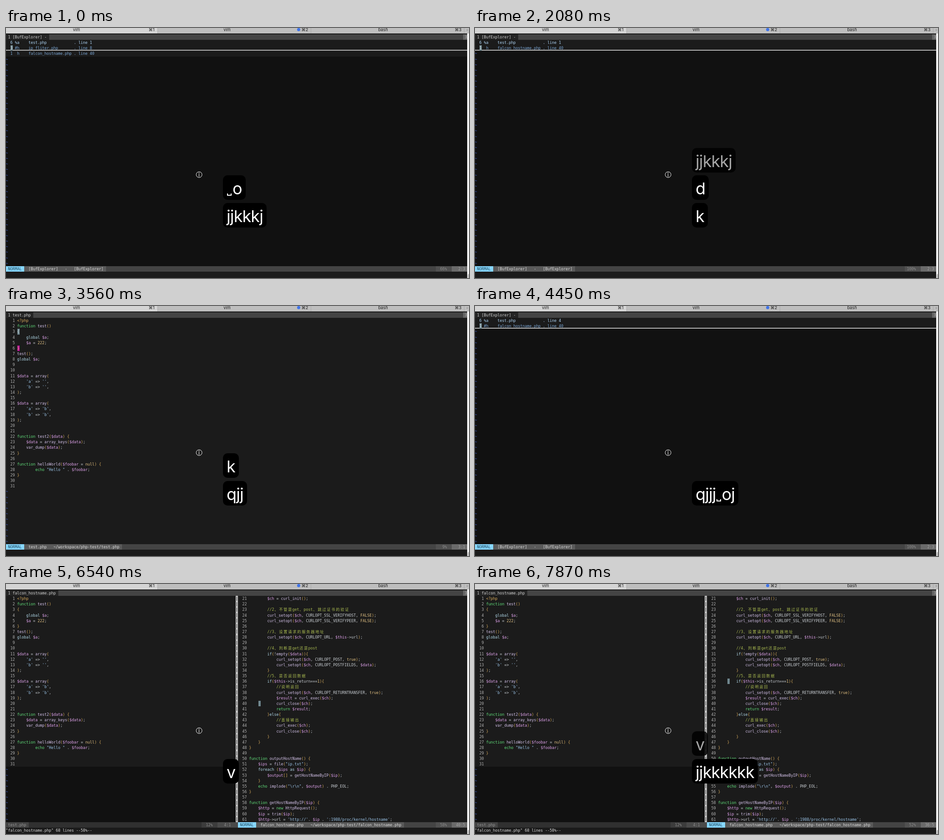
Animation, 1018 px wide and 550 px high, one loop 8 s. Source, as an HTML page:

```html
<!DOCTYPE html>
<html lang="en">
<head>
<meta charset="utf-8">
<title>Buffer explorer demo</title>
<style>
html, body { margin: 0; width: 100%; height: 100%; overflow: hidden; background: #1b1b1b; }
#stage { position: relative; width: 1018px; height: 550px; overflow: hidden; background: #1b1b1b; }
#stage div, #stage svg { position: absolute; }
#tabs { left: 0; top: 0; width: 1018px; height: 12px; background: #bebebe;
  font: 9.2px/11px Inter, "DejaVu Sans", sans-serif; color: #1c1c1c; }
#tabs .on { left: 0; top: 0; width: 333px; height: 12px; background: #d4d4d4; }
#tabs .sep { top: 0; width: 1px; height: 12px; background: #a9a9a9; }
#tabs .label { top: -2px; width: 80px; margin-left: -40px; text-align: center; }
#tabs .dot { left: 640px; top: -.5px; width: 7px; height: 7px; border-radius: 50%; background: #3f74ea; }
#side { left: 1014px; top: 12px; width: 4px; height: 538px; background: #f3f3f3; }
#thumb { left: 1015px; top: 541px; width: 3px; height: 9px; border-radius: 3px 0 0 0; background: #bdbdbd; }
#term { left: -.5px; top: 14px; width: 1014.5px; height: 536px; overflow: hidden;
  font: 8.305px/12.14px "DejaVu Sans Mono", "Noto Sans CJK SC", monospace; color: #c8cdd2; white-space: pre; }
#term i { display: inline-block; width: 10px; font-style: normal; text-align: center; }
.num { color: #b4b4b4; }
.tilde { color: #3d5cc4; }
.tag, .par { color: #d7ab5c; }
.fn { color: #62e27c; }
.kw { color: #b4dcec; }
.var { color: #e2a4ee; }
.val { color: #e2c284; }
.str { color: #9cc6ea; }
.com { color: #a9ba50; }
.call { color: #d6c4ec; }
.cur { color: #d9e4e8; background: #6f868e; }
.match { color: #f0d860; background: #b8109c; }
.key { left: 477px; height: 54px; padding: 0 8px; border-radius: 10px; background: #000; color: #fff;
  font: 36px/59px Inter, "Liberation Sans", sans-serif; letter-spacing: -.9px; white-space: nowrap; }
.key.dim { background: rgba(0, 0, 0, .85); color: #a6a6a6; }
.key b { display: inline-block; box-sizing: border-box; width: 10px; height: 5px; margin: 0 2px -3px 1px;
  border: solid; border-width: 0 2px 2px; }
</style>
</head>
<body>
<div id="stage">
  <div id="tabs">
    <div class="on"></div>
    <div class="sep" style="left:333px"></div>
    <div class="sep" style="left:670px"></div>
    <div class="sep" style="left:1007px"></div>
    <div class="label" style="left:155px">vim</div>
    <div class="label" style="left:320px">⌘1</div>
    <div class="label" style="left:486px">vim</div>
    <div class="dot"></div>
    <div class="label" style="left:657px">⌘2</div>
    <div class="label" style="left:829px">bash</div>
    <div class="label" style="left:994px">⌘3</div>
    <div class="label" style="left:1014px;color:#8c8c8c">+</div>
  </div>
  <div id="term"></div>
  <div id="side"></div>
  <div id="thumb"></div>
  <svg style="left:416px;top:314px" width="18" height="18" fill="none" stroke="#f2f2f2">
    <circle cx="8.6" cy="8.6" r="6.4"/>
    <path d="M6.6 4.2q1.6 0 1.8 1.3v6.2q-.2 1.3-1.8 1.3M10.2 4.2q-1.6 0-1.8 1.3M10.2 13q-1.6 0-1.8-1.3M7 9.4h2.8" stroke-width=".7"/>
  </svg>
  <div id="keys"></div>
</div>
<script>
const CW = 5, RH = 12.14, COLS = 203, LOOP = 8000;
const term = document.getElementById('term');
const keyBox = document.getElementById('keys');

const testCode = String.raw`<?php
function test()
{
    global $a;
    $a = 222;
}
test();
global $a;


$data = array(
    'a' => '',
    'b' => '',
);

$data = array(
    'a' => 'b',
    'b' => 'b',
);


function test2($data) {
    $data = array_keys($data);
    var_dump($data);
}

function helloWorld($foobar = null) {
        echo "Hello " . $foobar;
}

`.split('\n');

const hostCode = String.raw`        $ch = curl_init();

        //2、不管是get、post、跳过证书的验证
        curl_setopt($ch, CURLOPT_SSL_VERIFYHOST, FALSE);
        curl_setopt($ch, CURLOPT_SSL_VERIFYPEER, FALSE);

        //3、设置请求的服务器地址
        curl_setopt($ch, CURLOPT_URL, $this->url);

        //4、判断是get还是post
        if(!empty($data)){
            curl_setopt($ch, CURLOPT_POST, true);
            curl_setopt($ch, CURLOPT_POSTFIELDS, $data);
        }
        //5、是否返回数据
        if($this->is_return===1){
            //说明返回
            curl_setopt($ch, CURLOPT_RETURNTRANSFER, true);
            $result = curl_exec($ch);
            curl_close($ch);
            return $result;
        }else{
            //直接输出
            curl_exec($ch);
            curl_close($ch);
        }
    }
}

function outputHostName() {
    $ips = file("ip.txt");
    foreach ($ips as $ip) {
        $output[] = getHostNameByIP($ip);
    }
    echo implode("\r\n", $output) . PHP_EOL;
}

function getHostNameByIP($ip) {
    $http = new HttpRequest();
    $ip = trim($ip);
    $http->url = 'http://'. $ip . ':1988/proc/kernel/hostname';`.split('\n');

// Syntax colouring: one capture group per class
const classes = ['com', 'str', 'var', 'tag', 'fn', 'kw', 'val', 'call', 'par'];
const tokens = /(\/\/.*)|('[^']*'|"[^"]*")|(\$\w+)|(<\?php)|\b(function|echo|return|new)\b|\b(global|if|else|foreach|as)\b|\b(\d+|true|FALSE|null)\b|(\w+(?=\())|([()[\]{}])/g;
const esc = s => s.replace(/</g, '&lt;');
const wide = s => s.replace(/[\u3001\u4e00-\u9fff]/g, '<i>$&</i>');
const paint = s => s.replace(tokens, (m, ...g) =>
  `<span class="${classes[g.findIndex((v, i) => i < classes.length && v !== undefined)]}">${wide(esc(m))}</span>`);

// Text or colour block at a terminal cell
const put = (row, col, html, cls = '', css = '') =>
  `<div class="${cls}" style="left:${col * CW}px;top:${(row * RH).toFixed(2)}px;height:${RH}px;${css}">${html}</div>`;
const block = (row, from, to, bg, rows = 1) =>
  put(row, from, '', '', `width:${(to - from) * CW}px;height:${(rows * RH).toFixed(2)}px;background:${bg}`);

const tabLine = name => {
  const end = name.length + 4;
  return block(0, 0, COLS, '#444') + block(0, 0, end, '#242424') + block(0, 201, COLS, '#666') +
    put(0, 1, '1 ' + name, '', 'color:#d2d2d2') + put(0, 202, 'X', '', 'color:#a4a4a4');
};

const ruler = (w, pct, pos, bg, end = w) =>
  block(42, w - 14, w - 7, bg[0]) + block(42, w - 7, end, bg[1]) +
  put(42, w - 9 - pct.length, pct, '', 'color:#8c8c8c') +
  put(42, w - 1 - pos.length, pos, '', `color:${bg[2]}`);

const status = (col, names, pct, pos) => {
  const text = names.join('   ');
  return block(42, col, COLS, '#444') + block(42, col, col + 8, '#87d7ff') +
    block(42, col + 8, col + 11 + text.length, '#5a5a5a') +
    put(42, col + 1, 'NORMAL', '', 'color:#1d4a5c') +
    put(42, col + 10, text, '', 'color:#dcdcdc') +
    ruler(COLS, pct + '%', pos, ['#505050', '#6a6a6a', '#a4a4a4']);
};

const tildes = from => {
  let s = '';
  for (let r = from; r < 42; r++) s += put(r, 0, '~', 'tilde');
  return s;
};

const listing = (lines, col, first) => lines.map((line, i) =>
  put(i + 1, col + 2, String(first + i).padStart(2), 'num') + put(i + 1, col + 5, paint(line))).join('');

const cursor = (row, col, ch = ' ', cls = 'cur') => put(row, col, esc(ch), cls, `width:${CW}px`);

const underline = row => put(row, 0, '', '',
  `width:1015px;height:2px;margin-top:${RH - 2.6}px;background:linear-gradient(#dcdcdc 50%, #8a8a8a 50%)`);

const list = (rows, cur) => {
  const n = rows.length;
  return block(n + 1, 0, COLS, '#111', 41 - n) + tabLine('[BufExplorer] -') +
    rows.map(([id, flag, name, line], i) => {
      const css = `color:${i ? '#7ba7d6' : '#b2d9fa'}`;
      return put(i + 1, 2, `${id} ${flag.padEnd(6)}${name.padEnd(20)}. line ${line}`, '', css);
    }).join('') +
    underline(cur) + cursor(cur, 2, String(rows[cur - 1][0])) + tildes(n + 1) +
    status(0, ['[BufExplorer]', '-', '[BufExplorer]'], Math.floor(cur / n * 100), cur + ':3');
};

const code = line => tabLine('test.php') + listing(testCode, 0, 1) + tildes(32) +
  cursor(line, 5, testCode[line - 1][0]) + (line === 3 ? cursor(6, 5, '}', 'match') : '') +
  status(0, ['test.php', '~/workspace/php-test/test.php'], Math.floor(line / 31 * 100), line + ':1');

const split = line => {
  const file = 'falcon_hostname.php';
  let bars = block(1, 101, 102, '#c4c4c4', 41);
  for (let r = 1; r < 42; r++)
    bars += put(r, 101, '', '', 'width:1px;height:9px;margin:1.5px 0 0 2px;background:#333');
  return tabLine(file) + block(32, 0, 101, '#111', 10) + listing(testCode, 0, 1) + tildes(32) + bars +
    listing(hostCode, 102, 21) + cursor(line - 20, 111) +
    status(102, [file, '~/workspace/php-test/' + file], Math.floor(line / 68 * 100), line + ':5') +
    block(42, 0, 102, '#303030') + block(42, 0, 10, '#444') + put(42, 1, 'test.php', '', 'color:#949494') +
    ruler(100, '12%', '4:1', ['#3c3c3c', '#4a4a4a', '#8c8c8c'], 102) +
    put(43, 0, `"${file}" 68 lines --58%--`, '', 'color:#dcdcdc');
};

const test = line => [6, '%a', 'test.php', line];
const host = flag => [1, flag, 'falcon_hostname.php', 40];
const three = [test(1), [3, '#h', 'ip_fliter.php', 8], host(' h')];
const two = [test(1), host(' h')];
const back = [test(4), host('#h')];

// time, key bubbles from top to bottom (~ fading, _ space), new screen
const steps = [
  [0, '_o jjkkkj', list(three, 2)],
  [450, '~_o jjkkkj'],
  [600, 'jjkkkj'],
  [1340, 'jjkkkj d'],
  [1490, 'jjkkkj d', list(two, 2)],
  [2080, '~jjkkkj d k'],
  [2230, 'd k', list(two, 1)],
  [2820, 'd k q'],
  [2970, 'd k q', code(1)],
  [3260, '~d k qj'],
  [3410, 'k qjj', code(2)],
  [3560, 'k qjj', code(3)],
  [3710, 'k qjjj'],
  [3860, 'k qjjj', code(4)],
  [4000, '~k qjjj_'],
  [4150, 'qjjj_o', list(back, 1)],
  [4450, 'qjjj_oj', list(back, 2)],
  [5940, 'qjjj_oj v', split(40)],
  [6390, '~qjjj_oj v'],
  [6540, 'v'],
  [6690, 'v j', split(41)],
  [6840, 'v jj', split(42)]
];
for (let n = 1; n <= 6; n++)
  steps.push([Math.floor((6994 + n * 146) / 10) * 10, (n === 6 ? '~' : '') + 'v jj' + 'k'.repeat(n), split(42 - n)]);
steps.forEach((s, i) => { s[2] = s[2] || steps[i - 1][2]; });

const bubbles = text => text.split(' ').reverse().map((k, i) =>
  `<div class="key${k[0] === '~' ? ' dim' : ''}" style="top:${384.5 - i * 60.5}px">` +
  k.replace('~', '').replace('_', '<b></b>') + '</div>').join('');

let shown = -1, screen = '';
function frame() {
  const t = performance.now() % LOOP;
  let i = steps.length - 1;
  while (steps[i][0] > t) i--;
  if (i !== shown) {
    shown = i;
    keyBox.innerHTML = bubbles(steps[i][1]);
    if (screen !== steps[i][2]) term.innerHTML = screen = steps[i][2];
  }
  requestAnimationFrame(frame);
}
frame();
</script>
</body>
</html>
```
